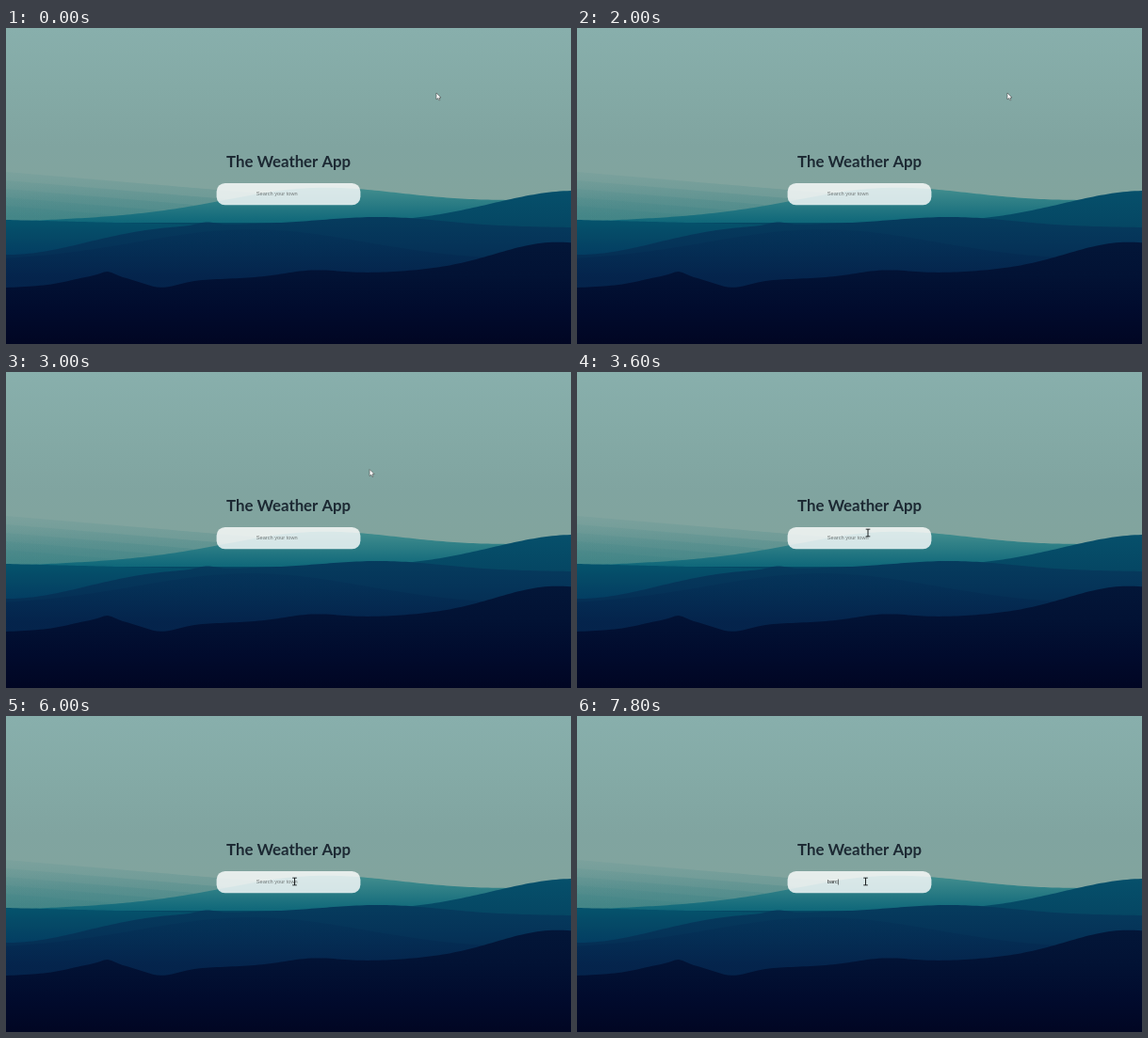
These frames come from a looping animation (600x336 px, 8000 ms). An HTML page with a canvas:

```html
<!DOCTYPE html>
<html lang="en">
<head>
<meta charset="utf-8">
<title>The Weather App</title>
<style>
html, body { margin: 0; width: 100%; height: 100%; overflow: hidden; background: #010824; }
canvas { display: block; width: 600px; height: 336px; }
</style>
</head>
<body>
<canvas id="stage" width="600" height="336"></canvas>
<script>
const W = 600, H = 336, LOOP = 8000, STEP = 200;
const ctx = document.getElementById('stage').getContext('2d');

const ease = p => p * p * (3 - 2 * p);
const clamp = p => Math.min(1, Math.max(0, p));
const bump = (x, mid, width, rise) => rise * Math.exp(-(((x - mid) / width) ** 2));

function shade(y0, y1, ...colors) {
  const g = ctx.createLinearGradient(0, y0, 0, y1);
  colors.forEach((c, i) => g.addColorStop(i / (colors.length - 1), c));
  return g;
}

// Everything below the curve y = height(x).
function hill(height, fill) {
  ctx.beginPath();
  ctx.moveTo(0, H);
  for (let x = 0; x <= W; x += 4) ctx.lineTo(x, height(x));
  ctx.lineTo(W, H);
  ctx.fillStyle = fill;
  ctx.fill();
}

function landscape() {
  ctx.fillStyle = shade(0, 190, '#88afac', '#84aaa6', '#80a4a0', '#82a49d');
  ctx.fillRect(0, 0, W, H);

  // mist: a fan of thin veils
  for (let i = 0; i < 5; i++) {
    const top = 153 + 9 * i;
    hill(x => top + 0.085 * x, shade(top, top + 30, 'rgba(30,115,122,.06)', 'rgba(30,115,122,.2)'));
  }
  hill(x => 206 - 0.04 * x - bump(x, 325, 130, 23), shade(168, 206, '#45908f', '#10687a'));

  // blue hills
  hill(x => 207 - bump(x, 605, 125, 34), shade(172, 214, '#06506b', '#054663'));
  hill(x => 204 + 0.025 * x, shade(204, 242, '#05536c', '#054866', '#033d62'));
  hill(x => 206 + 0.01 * x - bump(x, 400, 90, 9) - bump(x, 213, 14, 3) + bump(x, 0, 120, 35),
    shade(200, 265, '#063c5e', '#053358', '#05284e'));
  hill(x => 248 - bump(x, 260, 170, 34), shade(212, 268, 'rgba(4,45,85,.3)', 'rgba(4,33,74,.6)'));

  // foreground
  hill(x => 276 - 0.04 * x - bump(x, 100, 40, 9) - bump(x, 108, 10, 4) + bump(x, 165, 25, 7)
    - bump(x, 325, 40, 5.5) - bump(x, 580, 85, 25),
    shade(228, 336, '#031638', '#021234', '#010b2d', '#010623'));
}

function label(text, x, y, font, color) {
  ctx.font = font;
  ctx.fillStyle = color;
  ctx.fillText(text, x, y);
}

// time, x, y
const stops = [[2400, 457, 69], [2600, 428, 67], [3600, 309, 171], [4800, 310, 179], [6000, 306.5, 176]];

function pointer(t) {
  let [, x, y] = stops[0];
  for (let i = 1; i < stops.length; i++) {
    const [t0, x0, y0] = stops[i - 1], [t1, x1, y1] = stops[i];
    const p = ease(clamp((t - t0) / (t1 - t0)));
    x += (x1 - x0) * p;
    y += (y1 - y0) * p;
  }
  return [x, y];
}

function arrow(x, y) {
  ctx.beginPath();
  ctx.moveTo(x, y);
  ctx.lineTo(x, y + 7);
  ctx.lineTo(x + 1.7, y + 5.6);
  ctx.lineTo(x + 2.9, y + 8);
  ctx.lineTo(x + 3.9, y + 7.5);
  ctx.lineTo(x + 2.8, y + 5.1);
  ctx.lineTo(x + 5, y + 5);
  ctx.closePath();
  ctx.fillStyle = '#fff';
  ctx.fill();
  ctx.strokeStyle = '#333';
  ctx.lineWidth = 0.5;
  ctx.stroke();
}

function beam(x, y) {
  ctx.fillStyle = '#1c2022';
  ctx.fillRect(x - 0.5, y - 4, 1, 8);
  ctx.fillRect(x - 2.3, y - 4.3, 4.6, 0.9);
  ctx.fillRect(x - 2.3, y + 3.4, 4.6, 0.9);
}

function searchBox(word) {
  const font = '5.65px "Liberation Sans", Arial, sans-serif';
  ctx.beginPath();
  ctx.roundRect(223.6, 164.9, 152.8, 23.4, 9);
  ctx.fillStyle = 'rgba(255,255,255,.8)';
  ctx.fill();
  label(word || 'Search your town', 265.8, 178.2, font, word ? '#222' : '#717777');
  if (word) ctx.fillRect(266 + ctx.measureText(word).width, 173.5, 0.6, 6);
}

function draw(now) {
  const t = Math.floor(now % LOOP / STEP) * STEP;
  landscape();
  label('The Weather App', 234, 148, '700 16.8px Lato, sans-serif', '#1c2933');
  searchBox('barc'.slice(0, Math.max(0, (t - 7000) / STEP)));

  const [x, y] = pointer(t);
  const inside = x > 224 && x < 376 && y > 165 && y < 188;
  (inside ? beam : arrow)(x, y);
}

const start = performance.now();
function tick() {
  draw(performance.now() - start);
  requestAnimationFrame(tick);
}
tick();
</script>
</body>
</html>
```
